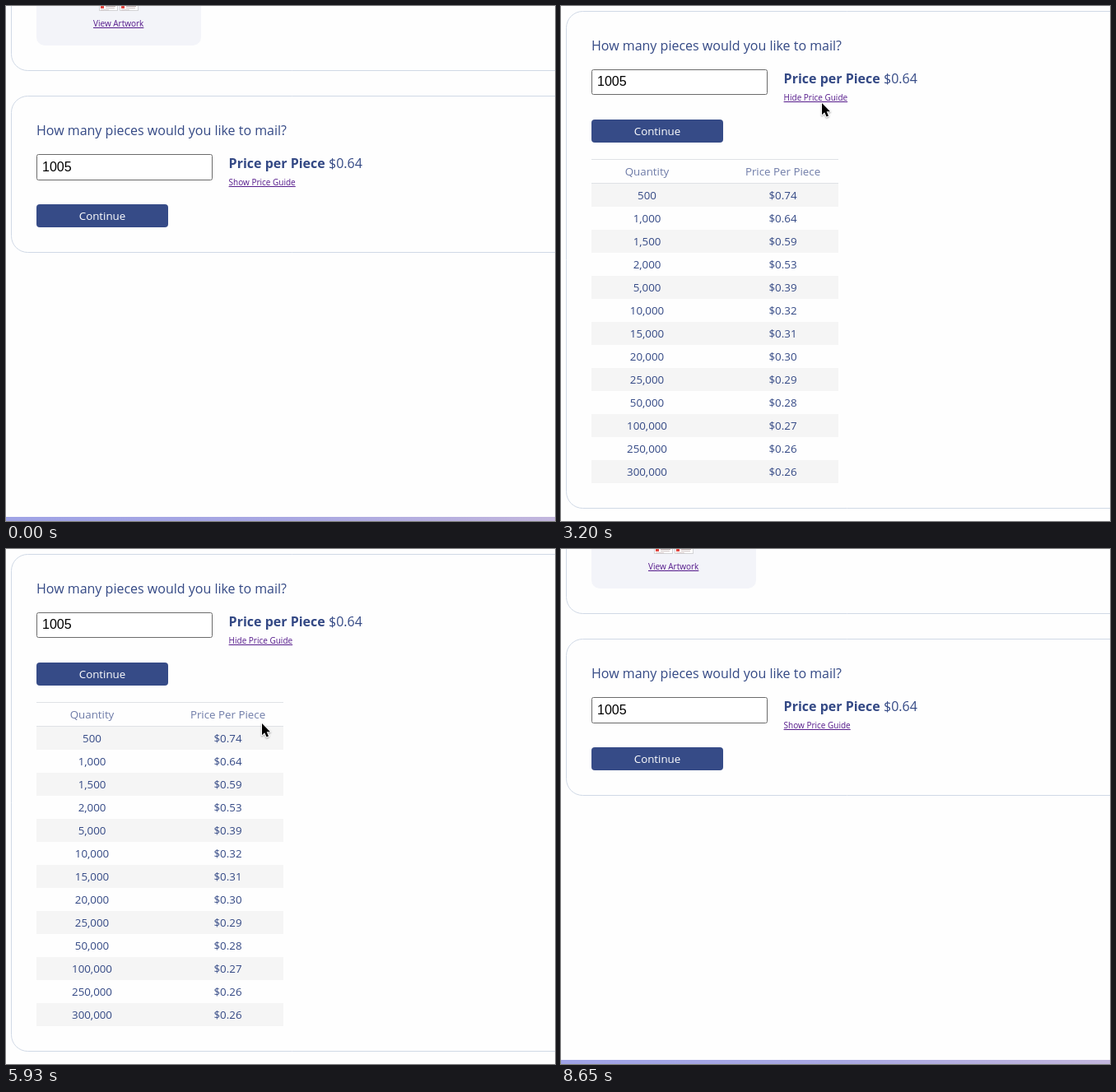
An HTML page with a canvas for the animation above (8890 ms loop, 667 px wide and 626 px high).

```html
<!DOCTYPE html>
<html lang="en">
<head>
<meta charset="utf-8">
<title>Price guide</title>
<style>
html, body { margin: 0; width: 100%; height: 100%; overflow: hidden; background: #fefefe; }
canvas { display: block; width: 667px; height: 626px; }
</style>
</head>
<body>
<canvas id="stage"></canvas>
<script>
const W = 667, H = 626, LOOP = 8890, STEP = LOOP / 75;
const SANS = '"Open Sans", "Noto Sans", sans-serif';
const NAVY = '#344985', PURPLE = '#551a8b', BORDER = '#d0d9e6';
const PRICES = [
  ['500', '0.74'], ['1,000', '0.64'], ['1,500', '0.59'], ['2,000', '0.53'],
  ['5,000', '0.39'], ['10,000', '0.32'], ['15,000', '0.31'], ['20,000', '0.30'],
  ['25,000', '0.29'], ['50,000', '0.28'], ['100,000', '0.27'], ['250,000', '0.26'],
  ['300,000', '0.26']
];
// Pointer hot spot: step, x, y
const PATH = [
  [2, 637, 338], [4, 470, 262], [6, 360, 232], [9, 301, 219], [21, 301, 219],
  [23, 304, 200], [25, 313, 140], [27, 317, 118], [29, 317, 117], [30, 320, 115],
  [34, 320, 115], [37, 319, 113], [39, 320, 150], [41, 316, 196], [42, 315, 206],
  [44, 315, 210], [45, 315, 210], [47, 310, 212], [50, 311, 212], [51, 312, 203],
  [53, 317, 153], [55, 320, 125], [57, 321, 116], [59, 321, 114], [67, 321, 114],
  [69, 350, 130], [71, 500, 230], [72, 630, 320], [73, 700, 380]
];
const ARROW = new Path2D('M0 0V14.2L3.2 11.2L5.6 16.6L8 15.6L5.7 10.3H10Z');
const HAND = new Path2D('M3.7 2.4Q3.6 .8 5 .7Q6.4 .7 6.8 2.2L7.8 6.2Q9 5.2 10 6.5' +
  'Q11.4 5.7 12.1 7.1Q13.8 6.6 14.2 8.6L14.4 11Q14.3 12.8 13.2 14.2V16.2H6.8L6.6 15' +
  'Q4.4 13 2.9 10.6Q1 8.9 1.8 8.1Q3 7.3 5 9.3Z');
const FINGERS = new Path2D('M8.2 10.2V13.4M10.1 10.2V13.4M12 10.2V13.4');

const canvas = document.getElementById('stage');
const ctx = canvas.getContext('2d');
const ratio = window.devicePixelRatio || 1;
canvas.width = Math.round(W * ratio);
canvas.height = Math.round(H * ratio);

function rect(x, y, w, h, color) {
  ctx.fillStyle = color;
  ctx.fillRect(x, y, w, h);
}

function box(x, y, w, h, r, fill, stroke) {
  ctx.beginPath();
  ctx.roundRect(x, y, w, h, r);
  if (fill) { ctx.fillStyle = fill; ctx.fill(); }
  if (stroke) { ctx.strokeStyle = stroke; ctx.lineWidth = 1; ctx.stroke(); }
}

function text(str, x, y, size, color, align = 'left', weight = 400, family = SANS) {
  ctx.font = `${weight} ${size}px ${family}`;
  ctx.textAlign = align;
  ctx.fillStyle = color;
  ctx.fillText(str, x, y);
  return ctx.measureText(str).width;
}

function link(str, x, y) {
  const w = text(str, x, y, 10, PURPLE);
  rect(x, y + 1, w, 1, PURPLE);
}

function pageState(n) {
  const start = n < 46 ? 11 : 46, end = n < 46 ? 35 : 66;
  if (n < start || n >= end + 3) return { table: false, open: false, rows: 0, scroll: 0 };
  if (n < end) {
    const k = n - start;
    return { table: true, open: true, rows: Math.min(13, 2 + 3 * k), scroll: k >= 4 ? 103 : 0 };
  }
  const rows = Math.max(0, 11 - 6 * (n - end));
  return { table: true, open: false, rows, scroll: Math.max(0, Math.min(103, 28 * (rows - 8))) };
}

function pointerAt(n) {
  if (n < 2 || n >= 73) return null;
  const i = PATH.findIndex(p => p[0] > n);
  const a = PATH[i - 1], b = PATH[i], f = (n - a[0]) / (b[0] - a[0]);
  return { x: Math.round(a[1] + (b[1] - a[1]) * f), y: Math.round(a[2] + (b[2] - a[2]) * f) };
}

function drawArtwork() {
  box(6.5, -60.5, 760, 139, 20, null, BORDER);
  box(37, -60, 200, 108, 10, '#f3f4f9');
  for (const x of [113, 138]) {
    rect(x, 0, 23, 6, '#d3d3d6');
    rect(x + 1, 0, 21, 5, '#ffffff');
    rect(x + 2, 0, 4, 3, '#e0453f');
    rect(x + 8, 0, 12, 1, '#b9a9aa');
    rect(x + 8, 2, 11, 1, '#d0c4c4');
    rect(x + 2, 4, 10, 1, '#dccfcf');
  }
  link('View Artwork', 106, 25);
}

function drawTable(rows) {
  rect(37, 289, 300, 1, '#dfe2e6');
  text('Quantity', 104.5, 309, 13.333, '#6f7ca8', 'center');
  text('Price Per Piece', 269.5, 309, 13.333, '#6f7ca8', 'center');
  if (rows) rect(37, 318, 300, 1, '#dfe2e6');
  PRICES.slice(0, rows).forEach(([count, price], i) => {
    const y = 319 + 28 * i;
    if (i % 2 === 0) rect(37, y, 300, 28, '#f5f5f5');
    text(count, 104.5, y + 19, 13.333, NAVY, 'center');
    text('$' + price, 269.5, y + 19, 13.333, NAVY, 'center');
  });
}

function drawForm(state, bottom) {
  const snap = state.scroll === 103 ? 1 : 0;
  box(6.5, 109.5, 760, bottom - 109.5, 20, null, BORDER);
  text('How many pieces would you like to mail?', 37, 157, 16, NAVY);
  box(37.5, 180.5, 213, 31 - snap, 2, '#ffffff', '#6b6b6b');
  text('1005', 44, 201 - snap, 16, '#000000', 'left', 400, '"Liberation Sans", Arial, sans-serif');
  text('Price per Piece', 270.6, 197, 16, NAVY, 'left', 700);
  text('$0.64', 392, 197, 16, NAVY);
  link(state.open ? 'Hide Price Guide' : 'Show Price Guide', 270.6, 218);
  box(37, 241, 160, 28, 4, '#364b87');
  text('Continue', 117, 260, 13.333, '#ffffff', 'center');
  if (state.table) drawTable(state.rows);
}

function drawFooter(y) {
  const g = ctx.createLinearGradient(0, 0, W, 0);
  g.addColorStop(0, '#9fa3e6');
  g.addColorStop(0.5, '#a8a7e2');
  g.addColorStop(1, '#c2b6dd');
  rect(0, y, W, 200, g);
}

function drawPointer(p, scroll) {
  const pageY = p.y + scroll;
  const overLink = p.x >= 270 && p.x <= 352 && pageY >= 206 && pageY <= 219;
  ctx.save();
  ctx.lineJoin = 'round';
  if (overLink) {
    ctx.translate(p.x - 5, p.y);
    ctx.fillStyle = '#ffffff';
    ctx.fill(HAND);
    ctx.strokeStyle = '#000000';
    ctx.lineWidth = 1.2;
    ctx.stroke(HAND);
    ctx.lineWidth = 0.9;
    ctx.stroke(FINGERS);
  } else {
    ctx.translate(p.x, p.y);
    ctx.shadowColor = 'rgba(0,0,0,.35)';
    ctx.shadowBlur = 2 * ratio;
    ctx.shadowOffsetY = ratio;
    ctx.strokeStyle = '#ffffff';
    ctx.lineWidth = 2;
    ctx.stroke(ARROW);
    ctx.shadowColor = 'transparent';
    ctx.fillStyle = '#000000';
    ctx.fill(ARROW);
  }
  ctx.restore();
}

function draw(now) {
  const n = Math.min(74, Math.floor((now % LOOP + 14) / STEP));
  const state = pageState(n);
  const bottom = !state.table ? 299.5 : state.rows ? 349.5 + 28 * state.rows : 347.5;
  ctx.setTransform(ratio, 0, 0, ratio, 0, 0);
  rect(0, 0, W, H, '#fefefe');
  ctx.translate(0, -state.scroll);
  drawArtwork();
  drawForm(state, bottom);
  drawFooter(Math.max(621, bottom + 47.5));
  ctx.translate(0, state.scroll);
  const p = pointerAt(n);
  if (p) drawPointer(p, state.scroll);
}

const begin = performance.now();
function tick() {
  draw(performance.now() - begin);
  requestAnimationFrame(tick);
}
tick();
</script>
</body>
</html>
```
